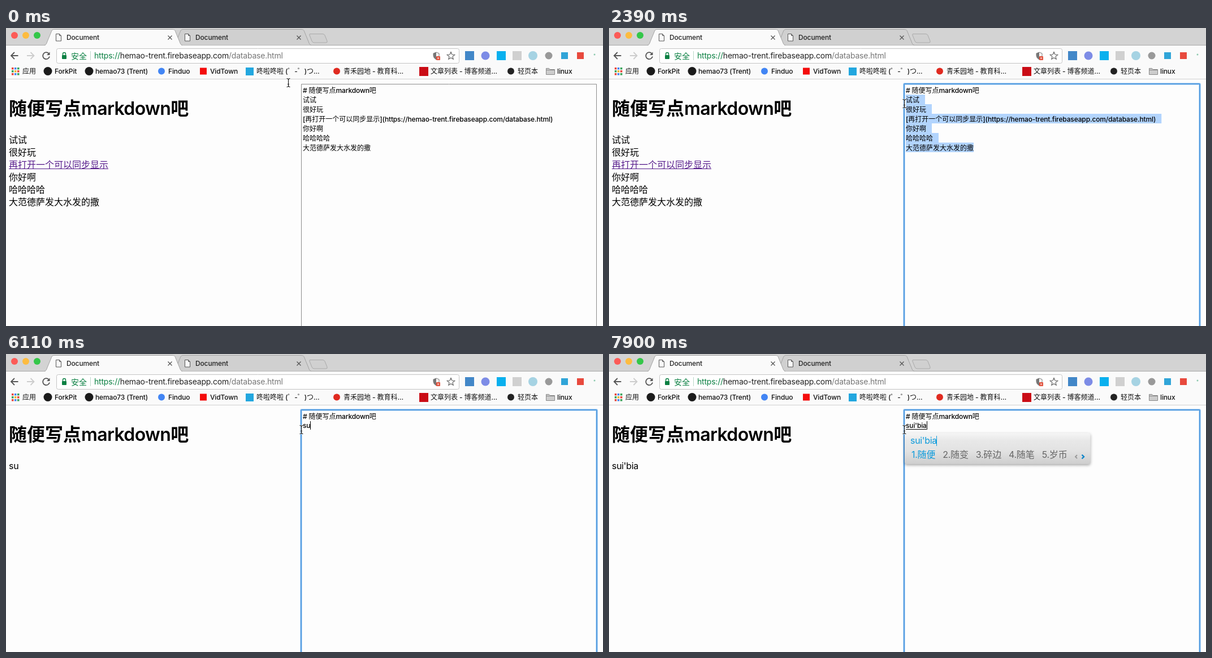
An HTML page with a canvas that plays this animation: 1056x528 px, repeating every 8 s.

```html
<!DOCTYPE html>
<html lang="zh-CN">
<head>
<meta charset="utf-8">
<title>Document</title>
<style>
html, body { margin: 0; width: 100%; height: 100%; overflow: hidden; background: #fdfdfd; }
canvas { display: block; width: 1056px; height: 528px; }
</style>
</head>
<body>
<canvas id="stage" width="1056" height="528"></canvas>
<script>
const ctx = document.getElementById('stage').getContext('2d');
const LOOP = 8000;
const FAMILY = 'Inter, "Noto Sans CJK SC", "Noto Sans CJK", sans-serif';
const PAGE = '#fdfdfd';
const URL_HOST = 'hemao-trent.firebaseapp.com';
const TITLE = '随便写点markdown吧';
const LINK = '再打开一个可以同步显示';
const BODY = ['试试', '很好玩', LINK, '你好啊', '哈哈哈哈', '大范德萨发大水发的撒'];
const SOURCE = BODY.map(s => s === LINK ? `[${s}](https://${URL_HOST}/database.html)` : s);

// [time, text on the second line, candidates while composing]
const PAIRS = ['随便', '随变', '碎边', '随笔', '岁币'];
const TYPING = [
  [4190, ''], [5970, 's'], [6110, 'su'], [6560, 's'], [6710, ''],
  [7450, 's', ['是', '说', '上', '时', '三']],
  [7600, 'sui', ['岁', '随', '碎', '虽', '虽然']],
  [7750, "sui'b", PAIRS], [7900, "sui'bia", PAIRS]
];

// Text: Latin runs are tracked a little tighter than CJK runs.
function runs(s) { return s.match(/[\u3000-\uffff]+|[^\u3000-\uffff]+/g) || []; }

function tracking(size) {
  if (size < 13) return -0.012;
  return size < 15 ? -0.015 : -0.02;
}

function eachRun(s, size, weight, visit) {
  ctx.font = `${weight || (size < 13 ? 450 : 400)} ${size}px ${FAMILY}`;
  let x = 0;
  for (const run of runs(s)) {
    const latin = run.charCodeAt(0) < 0x3000;
    ctx.letterSpacing = latin ? `${size * tracking(size)}px` : '0px';
    if (visit) visit(run, x);
    x += ctx.measureText(run).width;
  }
  ctx.letterSpacing = '0px';
  return x;
}

function write(s, x, y, size = 12, color = '#000', weight) {
  ctx.fillStyle = color;
  return eachRun(s, size, weight, (run, dx) => ctx.fillText(run, x + dx, y));
}

const widthOf = (s, size = 12) => eachRun(s, size);

// Shapes
function rect(x, y, w, h, color) { ctx.fillStyle = color; ctx.fillRect(x, y, w, h); }

function disc(x, y, r, color) {
  ctx.fillStyle = color;
  ctx.beginPath();
  ctx.arc(x, y, r, 0, Math.PI * 2);
  ctx.fill();
}

function round(x, y, w, h, r, fill, stroke, line = 1) {
  ctx.beginPath();
  ctx.roundRect(x, y, w, h, r);
  if (fill) { ctx.fillStyle = fill; ctx.fill(); }
  if (stroke) { ctx.strokeStyle = stroke; ctx.lineWidth = line; ctx.stroke(); }
}

function path(d, stroke, line = 1, fill, x = 0, y = 0) {
  const p = new Path2D(d);
  ctx.save();
  ctx.translate(x, y);
  if (fill) { ctx.fillStyle = fill; ctx.fill(p); }
  if (stroke) { ctx.strokeStyle = stroke; ctx.lineWidth = line; ctx.stroke(p); }
  ctx.restore();
}

function tab(x, active) {
  const fill = active ? '#fafafa' : '#d0d0d0';
  const edge = 'M0 30.5 C3 30 4 27 5 24 L12 7 C13 4 14 2.5 17 2.5 L226 2.5 C230 2.5 231 4 232 7 L239 24 C240 27 241 30 244 30.5';
  path(edge, '#a3a3a3', 1, fill, x);
  path('M20.5 10.5 h6 l3 3 v9.5 h-9 z M26.5 10.5 v3 h3', '#555', 1, '#fafafa', x);
  write('Document', x + 39, 21, 12, '#222');
  path('M218.5 13.5 l7 7 m0 -7 l-7 7', '#555', 1.3, null, x);
}

function tabStrip() {
  rect(0, 0, 1056, 31, '#d3d3d3');
  ['#fc5b57', '#fdbc40', '#34c749'].forEach((c, i) => disc(15 + i * 20, 13, 6, c));
  rect(0, 30, 1056, 1, '#a9a9a9');
  path('M538 10.5 H560 Q563 10.5 564 13 L568 23 Q569 26 566 26 H545 Q542 26 541 23 L537 13 Q536 10.5 538 10.5 Z', '#aaa', 1, '#d0d0d0');
  tab(296, false);
  rect(0, 31, 1056, 60, '#fafafa');
  tab(68, true);
  rect(70, 30, 240, 2, '#fafafa');
}

function addressBar() {
  path('M21.5 49 H9.5 M15 43 L9 49 L15 55', '#555', 1.8);
  path('M37 49 H49 M43.5 43 L49.5 49 L43.5 55', '#ccc', 1.8);
  path('M75.5 45 A6 6 0 1 0 77 50.5', '#555', 1.8);
  path('M77.5 42.5 V48 H72 Z', null, 1, '#555');

  round(89.5, 36.5, 712, 26, 3, '#fff', '#c4c4c4');
  const green = '#0b8043';
  round(99, 48, 8, 7, 1, green);
  path('M100.5 48 V46 A2.5 2.5 0 0 1 105.5 46 V48', green, 1.4);
  write('安全', 115, 54.5, 14, green);
  rect(149, 41, 1, 16, '#b9d8c7');
  let x = 156;
  x += write('https://', x, 54, 14, green);
  x += write(URL_HOST, x, 54, 14, '#222');
  write('/database.html', x, 54, 14, '#777');

  path('M761 43 L766 45 V49 Q766 53 761 56 Q756 53 756 49 V45 Z', '#777', 1, '#fff');
  path('M761 43 V56 Q756 53 756 49 V45 Z', null, 1, '#777');
  round(761, 50, 7, 7, 1, '#e0503c');
  path('M763 52 l3 3 m0 -3 l-3 3', '#fff', 1);
  path('M787 42.5 L788.9 47 L793.7 47.4 L790 50.6 L791.2 55.3 L787 52.7 L782.8 55.3 L784 50.6 L780.3 47.4 L785.1 47 Z', '#666', 1.2);
}

function extensions() {
  rect(812, 41, 16, 16, '#4287c8');
  disc(848, 49, 7.5, '#7d8ce6');
  rect(868, 41, 16, 16, '#09b0ee');
  rect(896, 41, 16, 16, '#d0d0d0');
  disc(932, 49, 8, '#a6d3e3');
  disc(960, 49, 6.5, '#999');
  rect(982, 43, 12, 12, '#30a5d8');
  rect(1010, 43, 12, 12, '#e8493d');
  disc(1041, 47, 1.5, '#8cc9ae');
}

function bookmarks() {
  const hues = ['#e9453a', '#f0b429', '#38a35a', '#4285f4'];
  for (let i = 0; i < 9; i++) {
    const col = i % 3, row = Math.floor(i / 3);
    rect(10 + col * 5, 70 + row * 5, 3.5, 3.5, hues[(i * 3 + row) % 4]);
  }
  disc(74, 76.5, 7.5, '#1b1b1b');
  disc(147, 76.5, 7.5, '#1b1b1b');
  disc(275, 76.5, 6, '#4285f4');
  rect(343, 70.5, 12, 12, '#f40c0c');
  rect(424, 70, 14, 14, '#22a7df');
  disc(585, 76.5, 6, '#e02a20');
  rect(731, 69, 16, 16, '#ca0c16');
  disc(893, 76.5, 6, '#222');
  path('M955.5 71.5 h5 l2 2 h8 v9 h-15 z M955.5 74.5 h15', '#888', 1, '#ccc');
  [['应用', 29], ['ForkPit', 86], ['hemao73 (Trent)', 158], ['Finduo', 287], ['VidTown', 361],
    ['咚啦咚啦 (゜-゜)つ...', 443], ['青禾园地 - 教育科...', 597], ['文章列表 - 博客频道...', 751],
    ['轻页本', 905], ['linux', 975]
  ].forEach(([s, x]) => write(s, x, 81, 12, '#111'));
  rect(0, 90, 1056, 1, '#d0d0d0');
}

// Pointer
const ease = p => p * p * (3 - 2 * p);
const mix = (a, b, p) => a + (b - a) * p;

function pointer(t) {
  if (t < 450) {
    const p = ease(Math.floor(t / 150) / 3);
    return [mix(499, 653, p), mix(97, 231, p)];
  }
  if (t < 750) return [653, 231];
  if (t < 2090) {
    const p = ease(Math.max(0, Math.floor((t - 1050) / 150)) / 7);
    return [mix(653, 522, p), mix(216, 131, p)];
  }
  return [522, t < 2390 ? 131 : 134];
}

function drawPointer([x, y]) {
  const d = 'M-3 -7.5 Q0 -7.5 0 -5 Q0 -7.5 3 -7.5 M0 -5 V5 M-3 7.5 Q0 7.5 0 5 Q0 7.5 3 7.5 M-1.5 2.5 H1.5';
  path(d, 'rgba(255,255,255,.8)', 2.4, null, x + 0.5, y);
  path(d, '#111', 1.1, null, x + 0.5, y);
}

// Selects from the pointer's character to the end of the text.
function selection(x, y) {
  const first = Math.min(5, Math.max(0, Math.floor((y - 118) / 17)));
  for (let i = first; i < SOURCE.length; i++) {
    const s = SOURCE[i], end = widthOf(s);
    let left = 0;
    if (i === first) {
      for (let n = 1; n <= s.length; n++) {
        const w = widthOf(s.slice(0, n));
        if (x - 525 < (left + w) / 2) break;
        left = w;
      }
    }
    const right = i < 5 ? end + 10 : end;
    rect(525 + left, 118 + i * 17, right - left, 17, '#b2d4fd');
  }
}

function caret(x, y) { rect(Math.round(x), y, 1, 15, '#000'); }

function composer(text, words) {
  const sizes = words.map((w, i) => widthOf(`${i + 1}.${w}`, 16) + 12.8);
  const tail = 535 + sizes.reduce((a, b) => a + b, 0);
  ctx.save();
  ctx.shadowColor = 'rgba(0,0,0,.35)';
  ctx.shadowBlur = 5;
  ctx.shadowOffsetY = 2;
  const g = ctx.createLinearGradient(0, 140, 0, 195);
  g.addColorStop(0, '#f5f5f5');
  g.addColorStop(0.25, '#e8e8e8');
  g.addColorStop(0.58, '#e2e2e2');
  g.addColorStop(1, '#cecece');
  round(523, 140, tail + 28 - 523, 55, 4, g);
  ctx.restore();
  const blue = '#0c9bdc';
  const w = write(text, 533, 159, 16, blue);
  rect(Math.round(532 + w), 145, 1, 18, blue);
  let x = 535;
  words.forEach((word, i) => {
    write(`${i + 1}.${word}`, x, 184, 16, i ? '#666' : blue);
    x += sizes[i];
  });
  path('M4.5 179 l-3 3 l3 3', '#999', 1.9, null, tail);
  path('M13 178.5 l3.5 3.5 l-3.5 3.5', '#0785c9', 2.4, null, tail);
}

function badge(t) {
  if (t < 7000 || t >= 7450) return;
  ctx.globalAlpha = t >= 7150 && t < 7300 ? 1 : 0.5;
  round(530, 140, 22, 22, 3, '#474747');
  write('中', 534, 156.5, 14, '#fff', 500);
  ctx.globalAlpha = 1;
}

function preview(t, text) {
  write(TITLE, 5, 154, 32, '#000', 600);
  if (t >= 4190) {
    write(text, 5, 204, 16);
    return;
  }
  BODY.forEach((s, i) => {
    const y = 204 + i * 22;
    const w = write(s, 5, y, 16, s === LINK ? '#551a8b' : '#000');
    if (s === LINK) rect(5, y + 1, w, 1, '#551a8b');
  });
}

function editor(t, at, text, words) {
  if (t < 1050) {
    round(522.5, 99.5, 522, 460, 0, PAGE, '#8c8c8c');
  } else {
    round(522, 99, 523, 460, 1, PAGE, '#b9d8f6', 4);
    round(522, 99, 523, 460, 1, null, '#559de0', 2);
  }
  if (t >= 1200 && t < 4190) selection(...at);
  write('# ' + TITLE, 525, 115);
  if (t < 4190) {
    SOURCE.forEach((s, i) => write(s, 525, 132 + i * 17));
    if (t >= 1050 && t < 1200) caret(645, 204);
    return;
  }
  const w = write(text, 525, 131);
  if (words) rect(525, 133, w, 1, '#000');
  const dark = (t >= 4780 && t < 5230) || (t >= 5670 && t < 5970);
  if (!dark) caret(525 + w, 119);
  if (words) composer(text, words);
  badge(t);
}

function draw(t) {
  const [, text = '', words] = TYPING.filter(k => k[0] <= t).pop() || [];
  const at = pointer(t);
  rect(0, 0, 1056, 528, PAGE);
  tabStrip();
  addressBar();
  extensions();
  bookmarks();
  preview(t, text);
  editor(t, at, text, words);
  drawPointer(at);
}

const start = performance.now();
function tick() {
  draw((performance.now() - start) % LOOP);
  requestAnimationFrame(tick);
}
tick();
</script>
</body>
</html>
```
